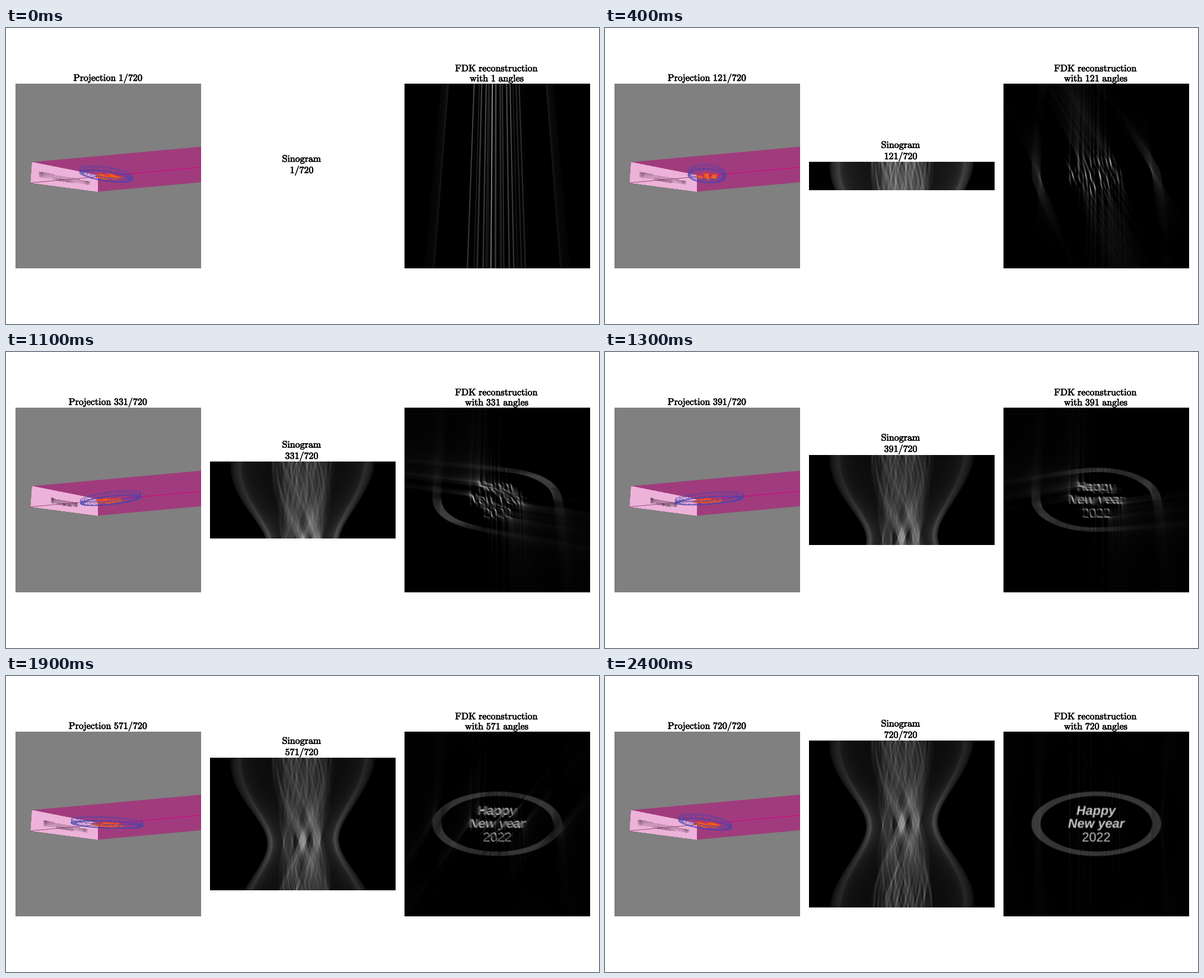
A matplotlib script that plays this animation: 1000 px wide and 500 px high, repeating every 3.5 s.

```python
import numpy as np
import matplotlib.pyplot as plt
from matplotlib.animation import FuncAnimation
from matplotlib.collections import LineCollection
from matplotlib.colors import LinearSegmentedColormap
from matplotlib.patches import PathPatch, Polygon, Rectangle
from matplotlib.path import Path
from matplotlib.patheffects import withStroke
from matplotlib.textpath import TextPath

plt.rcParams["mathtext.fontset"] = "cm"

# Scan geometry, in stage pixels around the rotation axis
ANGLES = 720
STEP = np.pi / ANGLES
R = 1219.0                 # source to axis
BINS = 800
TAU = 281.0 / BINS         # detector bin, scaled to the axis
CUTOFF = 0.5               # filter window, share of the Nyquist frequency
GRID = 480
A, B, INNER, MU = 109.5, 54.5, 0.86, 0.27
RING_Y = -0.4
COUNTS = [min(1 + 30 * i, ANGLES) for i in range(25)]
FRAMES = 35


# ---------- phantom ----------
def line_polys(text, x, base, em=21.7, **font):
    path = TextPath((0, 0), text, size=200,
                    prop=dict(family="Liberation Sans", **font))
    polys = [np.asarray(p) * em / 200 for p in path.to_polygons()]
    xs = np.concatenate(polys)[:, 0]
    mid = (xs.min() + xs.max()) / 2
    return [np.column_stack((p[:, 0] - mid + x, base - p[:, 1])) for p in polys]


def fill_points(polys, step):
    verts = np.concatenate(polys)
    (x0, y0), (x1, y1) = verts.min(0), verts.max(0)
    gx, gy = np.meshgrid(np.arange(x0, x1, step), np.arange(y0, y1, step))
    pts = np.column_stack((gx.ravel(), gy.ravel()))
    inside = np.zeros(len(pts), bool)
    for p in polys:
        inside ^= Path(p).contains_points(pts)
    return pts[inside]


LINES = [
    line_polys("Happy", 0.2, -15.5, weight="bold", style="italic"),
    line_polys("New year", 0.6, 6.3, weight="bold", style="italic"),
    line_polys("2022", 0.0, 29.5),
]


# ---------- forward projection ----------
def ellipse_chords(a, b):
    th = (np.arange(ANGLES) * STEP)[:, None]
    u = (np.arange(BINS) - (BINS - 1) / 2) * TAU
    c, s = np.cos(th), np.sin(th)
    sx, sy = -R * s, -R * c
    dx, dy = u * c - sx, -u * s - sy
    norm = np.hypot(dx, dy)
    dx, dy = dx / norm, dy / norm
    sy = sy - RING_Y
    qa = (dx / a) ** 2 + (dy / b) ** 2
    qb = sx * dx / a**2 + sy * dy / b**2
    qc = (sx / a) ** 2 + (sy / b) ** 2 - 1
    return 2 * np.sqrt(np.maximum(qb**2 - qa * qc, 0)) / qa


def text_projections():
    step = TAU / 2
    px, py = np.concatenate([fill_points(p, step) for p in LINES]).T
    rows = np.empty((ANGLES, BINS))
    for k in range(ANGLES):
        c, s = np.cos(k * STEP), np.sin(k * STEP)
        u = (px * c - py * s) * R / (R + px * s + py * c)
        f = u / TAU + (BINS - 1) / 2
        i = f.astype(int)
        f -= i
        rows[k] = np.bincount(i, 1 - f, BINS) + np.bincount(i + 1, f, BINS)
    return rows * step**2 / TAU


# ---------- filtered back projection ----------
def ramp_filter(sino):
    u = (np.arange(BINS) - (BINS - 1) / 2) * TAU
    size = 2048
    n = np.fft.fftfreq(size, 1 / size)
    odd = n % 2 == 1
    kernel = np.zeros(size)
    kernel[0] = 0.25
    kernel[odd] = -1 / (np.pi * n[odd]) ** 2
    freq = np.minimum(np.fft.rfftfreq(size) * 2 / CUTOFF, 1)
    window = 0.5 + 0.5 * np.cos(np.pi * freq)
    spec = np.fft.rfft(sino * R / np.hypot(R, u), size, axis=1)
    spec *= np.fft.rfft(kernel) * window
    return np.fft.irfft(spec, size, axis=1)[:, :BINS]


def reconstruct(sino):
    pad = 400
    rows = np.pad(ramp_filter(sino), ((0, 0), (pad, pad))).astype(np.float32)
    mid = (np.arange(GRID) + 0.5) / GRID - 0.5
    xs = (mid * 313).astype(np.float32)
    ys = (mid * 312).astype(np.float32)[:, None]
    acc = np.zeros((GRID, GRID), np.float32)
    offset = np.float32(pad + (BINS - 1) / 2)
    shots = []
    for k, row in enumerate(rows):
        c, s = np.float32(np.cos(k * STEP)), np.float32(np.sin(k * STEP))
        mag = np.float32(R) / (xs * s + (ys * c + np.float32(R)))
        f = (xs * c - ys * s) * mag
        f *= np.float32(1 / TAU)
        f += offset
        i = f.astype(np.int32)
        f -= i
        slope = np.diff(row, append=row[-1:])
        f *= slope[i]
        f += row[i]
        mag *= mag
        f *= mag
        acc += f
        if k + 1 in COUNTS:
            shots.append(np.maximum(acc, 0))
    return shots


ring = ellipse_chords(A, B) - ellipse_chords(A * INNER, B * INNER)
letters = text_projections()
sino = MU * ring + letters
recons = reconstruct(sino)


# ---------- scene view ----------
def project(x, y, v, th):
    """Object point (units of the short half axis) to the stage."""
    c, s = np.cos(th), np.sin(th)
    u, w = x * c - y * s, -x * s - y * c
    depth = 25.4 * u - 17.8 * w
    k = 1 / (1 + 0.0028 * depth)
    return np.column_stack((172.5 + (17.8 * u + 25.4 * w) * k,
                            248.5 + (0.2 * depth - v) * k))


def dish_lines(th, n=30, half=3.2):
    t = np.linspace(0, 2 * np.pi, n + 1)

    def loop(scale, v):
        return project(scale * A / B * np.cos(t), scale * np.sin(t), v, th)

    def rungs(p, q):
        return [seg for i in range(n)
                for seg in ((p[i], q[i]), (p[i], q[i + 1]))]

    top, low = loop(1, half), loop(1, -half)
    top_in, low_in = loop(INNER, half), loop(INNER, -half)
    return [top, low, low, top_in, low_in] + rungs(top, low) + rungs(low, low_in)


text_polys = [p for polys in LINES for p in polys]
text_verts = np.concatenate(text_polys) / B
text_codes = np.concatenate(
    [[Path.MOVETO] + [Path.LINETO] * (len(p) - 1) for p in text_polys])


def text_shape(v, th):
    return Path(project(*text_verts.T, v, th), text_codes)


DET = np.array([(44, 226.5), (154.5, 248.5), (154.5, 276.5), (41.5, 261.5)])
NU, NV = 100, 28


def detector_mesh():
    u, v = np.meshgrid(np.linspace(0, 1, NU + 1), np.linspace(0, 1, NV + 1))
    u, v = u[..., None], v[..., None]
    top = DET[0] * (1 - u) + DET[1] * u
    low = DET[3] * (1 - u) + DET[2] * u
    return np.moveaxis(top * (1 - v) + low * v, 2, 0)


def shadow(row):
    u = (np.arange(NU) + 0.5) / NU
    v = ((np.arange(NV) + 0.5) / NV)[:, None]
    wall, ink = (d[row].reshape(NU, -1).mean(1) for d in (ring, letters))
    start = 0.38 + 0.09 * u
    along = (v - start) / (0.68 - start)
    band = np.where((along > 0) & (along < 1), 1.1 - 0.8 * along, 0)
    marks = (v > 0.56) & (v < 0.71)
    return 1 - np.exp(-(wall * band + 1.5 * ink * marks) / 50)


# ---------- stage ----------
fig = plt.figure(figsize=(10, 5), dpi=100, facecolor="white")
ax = fig.add_axes([0, 0, 1, 1])
ax.axis("off")

ax.add_patch(Rectangle((16, 94), 313, 312, fc="#808080", lw=0))
ax.add_patch(Polygon([DET[0], (329, 200.5), (329, 260.5), DET[2]],
                     fc="#a03c7d", lw=0))
ax.add_patch(Polygon(DET, fc="#edb2d9", lw=0))
shades = LinearSegmentedColormap.from_list("shades", ["#edb2d9", "#5a3a52"])
mesh = ax.pcolormesh(*detector_mesh(), shadow(0), cmap=shades,
                     vmin=0, vmax=1, shading="flat")
ax.plot([41.5, 154.5], [261.5, 251.2], color="#7a2a5c", lw=0.5, zorder=1)
ax.plot([154.5, 329], [251.2, 235.3], color="#c4147f", lw=1.1,
        solid_capstyle="butt", zorder=1)

wires = ax.add_collection(
    LineCollection([], colors="#4444b0", linewidths=0.45, alpha=0.8), autolim=False)
LAYERS = [(-1.5, "#c03a48"), (-2.2, "#d03c40"), (-2.9, "#e04434"), (-3.6, "#f8601e")]
slabs = [ax.add_patch(PathPatch(text_shape(v, 0), fc=col, ec=col, lw=0.25))
         for v, col in LAYERS]

sino_im = ax.imshow(sino, cmap="gray", aspect="auto", extent=(344, 657, 391, 109))
recon_im = ax.imshow(recons[0], cmap="gray", aspect="auto",
                     extent=(672, 985, 406, 94))
ax.set_xlim(0, 1000)
ax.set_ylim(500, 0)


def label(x, y, text=""):
    return ax.text(x, y, text, fontsize=11.5, ha="center", va="baseline",
                   path_effects=[withStroke(linewidth=0.45, foreground="black")])


def roman(text):
    return r"$\mathrm{%s}$" % text.replace(" ", r"\ ")


left_title = label(172.5, 89.2)
sino_title = label(499.3, 85, roman("Sinogram"))
sino_count = label(499.3, 104)
label(827.8, 73.2, roman("FDK reconstruction"))
recon_count = label(828.2, 90.2)


def update(frame):
    i = min(frame, len(COUNTS) - 1)
    count = COUNTS[i]
    th = (count - 1) * STEP

    left_title.set_text(roman(f"Projection {count}/720"))
    mesh.set_array(shadow(count - 1))
    wires.set_segments(dish_lines(th))
    for slab, (v, _) in zip(slabs, LAYERS):
        slab.set_path(text_shape(v, th))

    half = 313 * count / BINS / 2
    part = sino[:count]
    sino_im.set_visible(count > 1)
    sino_im.set_data(part)
    sino_im.set_clim(0, 1.5 * part.max())
    sino_im.set_extent((344, 657, round(250 + half), round(250 - half)))
    sino_title.set_y(250 - half - 23.8)
    sino_count.set_y(250 - half - 4.8)
    sino_count.set_text(roman(f"{count}/720"))

    recon_im.set_data(recons[i])
    recon_im.set_clim(0, 1.2 * recons[i].max())
    recon_count.set_text(roman(f"with {count} angles"))
    return []


anim = FuncAnimation(fig, update, frames=FRAMES, interval=100, repeat=True)
plt.show()
```
